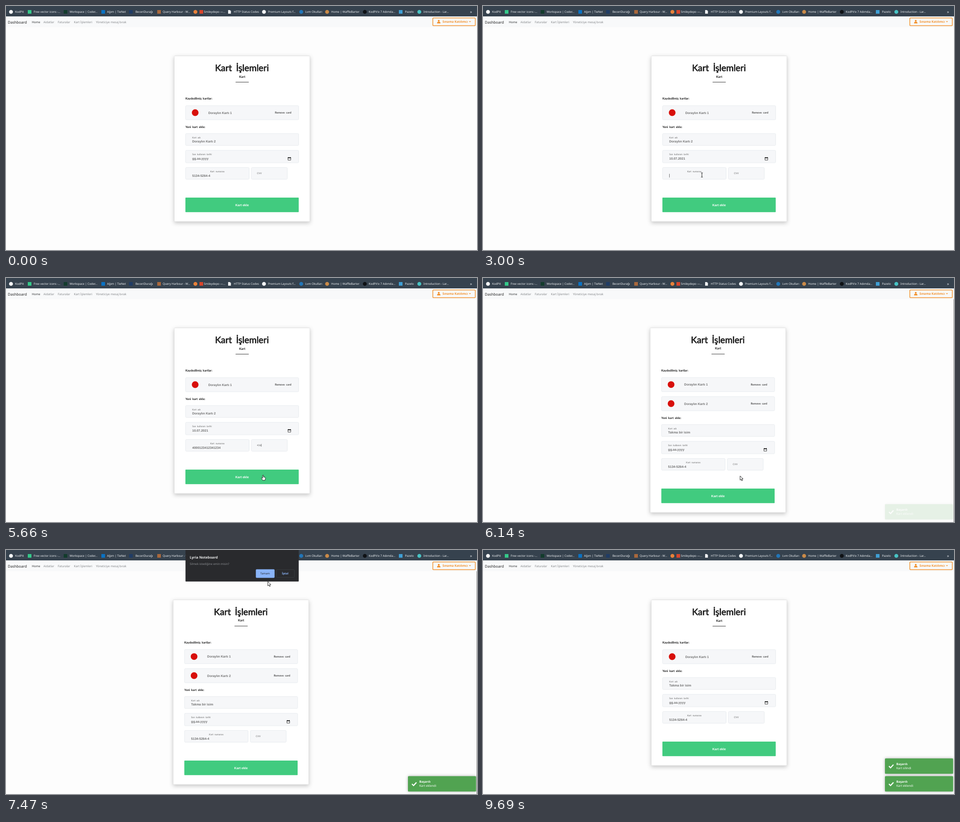
An HTML page that plays this animation: 1037x540 px, repeating every 9890 ms.

```html
<!DOCTYPE html>
<html lang="tr">
<head>
<meta charset="utf-8">
<title>Kart İşlemleri</title>
<style>
html, body { margin: 0; width: 100%; height: 100%; overflow: hidden; background: #fdfdfd; }
svg { display: block; width: 100vw; height: 100vh; }
text { white-space: pre; text-rendering: geometricPrecision; }
.ui { font-family: "Noto Sans", "Open Sans", sans-serif; }
.form { font-family: "Liberation Sans", Arial, sans-serif; font-weight: 700; font-size: 7px; fill: #707070; }
.hand { font-family: Lato, "Open Sans", sans-serif; word-spacing: 1.2px; }
.title { word-spacing: 4px; stroke: #1b1b1b; stroke-width: .75px; stroke-linejoin: round; }
.b { font-weight: 700; }
.m { font-weight: 600; }
.mid { text-anchor: middle; }
.panel { filter: drop-shadow(0 3px 5px rgba(0, 0, 0, .22)); }
.toast { filter: drop-shadow(0 0 3px rgba(0, 0, 0, .3)); }
</style>
</head>
<body>
<svg id="stage" viewBox="0 0 1037 540" xmlns="http://www.w3.org/2000/svg"></svg>
<script>
const LOOP = 9890;

const rect = (x, y, w, h, fill, more = "") =>
  `<rect x="${x}" y="${y}" width="${w}" height="${h}" fill="${fill}" ${more}/>`;
const dot = (x, y, r, fill) => `<circle cx="${x}" cy="${y}" r="${r}" fill="${fill}"/>`;
const path = (d, more) => `<path d="${d}" ${more}/>`;
const label = (x, y, s, size, cls, fill, more = "") =>
  `<text x="${x}" y="${y}" class="${cls}" style="font-size:${size}px;fill:${fill}" ${more}>${s}</text>`;
const value = (x, y, s, id = "") => `<text x="${x}" y="${y}" class="form" id="${id}">${s}</text>`;
const group = (id, body, more = "") => `<g id="${id}" ${more}>${body}</g>`;
const field = (x, y, w, h) => rect(x, y, w, h, "#f6f7f9", 'rx="2" stroke="#e6eaee" stroke-width=".9"');

// [icon x, shape, colour, text x, title]
const bookmarks = [
  [11, "o", "#f4f5f6", 20, "KodPit"],
  [52, "s", "#35c98a", 61, "Free vector icons -..."],
  [131, "s", "#123b2c", 140, "Workspace | Coder..."],
  [214, "s", "#0a72c4", 222.5, "Ağım | TieNet"],
  [275, "s", "#203c66", 285, "BeceriDurağı"],
  [337, "s", "#a9683c", 345, "Query Harbour - W..."],
  [417, "o", "#e8813a", 0, ""],
  [430, "s", "#d8452c", 435.5, "Smileydepo —..."],
  [492, "d", "#eceff1", 501.5, "HTTP Status Codes"],
  [568, "o", "#f1f3f4", 577, "Premium Layouts f..."],
  [650, "o", "#2276b8", 659, "Lvm Okulları"],
  [707, "o", "#c98a48", 716, "Home | WaffleBarter"],
  [790, "o", "#0f1215", 798.5, "KodPit'e 7 Adımda..."],
  [869, "s", "#3f9fd4", 878.5, "Pazelo"],
  [910, "o", "#48c3c4", 919, "Introduction - Lar..."]
];

function bookmarkIcon(x, shape, fill) {
  if (shape === "o") return dot(x, 13, 4.3, fill);
  if (shape === "s") return rect(x - 4, 9, 8, 8, fill);
  return path(`M${x - 3} 9h4l2.2 2.2v5.8h-6.2z`, `fill="${fill}"`);
}

function header() {
  const links = [[57, "Home", "#2a2c2e"], [82.5, "Aidatlar", "#808386"], [114, "Faturalar", "#808386"],
    [149.5, "Kart İşlemleri", "#808386"], [198, "Yöneticiye mesaj bırak", "#808386"]];
  const orange = "#f2902a";
  return rect(0, 0, 1037, 23, "#36424e") +
    bookmarks.map(([x, shape, fill, tx, s]) =>
      bookmarkIcon(x, shape, fill) + label(tx, 15.2, s, 6.3, "ui", "#f4f6f8")).join("") +
    label(1021.5, 15.5, "»", 9, "ui", "#e9ecef") +
    rect(0, 23, 1037, 24, "#f8f9fa") +
    label(4, 38.6, "Dashboard", 8.1, "ui", "#222") +
    links.map(([x, s, fill]) => label(x, 37.5, s, 6.45, "ui", fill)).join("") +
    rect(939.7, 26.6, 93.6, 16.8, "none", `rx="1.2" stroke="${orange}" stroke-width="1.5"`) +
    dot(952.8, 32.8, 2, orange) +
    path("M949.2 38.4v-1.2q0-2.2 2.2-2.2h2.8q2.2 0 2.2 2.2v1.2z", `fill="${orange}"`) +
    label(961, 37.3, "Sınama Katılımcı", 6.7, "ui m", orange) +
    path("M1019.2 33.7h4.6l-2.3 2.4z", `fill="${orange}"`);
}

const savedCard = n => field(395.4, 220.6, 249, 31.2) + dot(416.5, 236, 7.4, "#d80f0a") +
  value(445.5, 238.5, "Doraylın Kartı " + n) +
  label(592, 238.4, "Remove card", 6.1, "hand b", "#4c4c4c");

const calendarIcon = path("M620.9 335.6h6v5.5h-6z", 'fill="none" stroke="#111" stroke-width=".8"') +
  rect(620.5, 335, 6.8, 1.7, "#111") + rect(621.4, 334.3, 1, 1, "#111") + rect(625.4, 334.3, 1, 1, "#111");

function form() {
  return rect(370.5, 110.5, 298.5, 366.5, "#fff", 'id="panel" class="panel" stroke="#dcdcdc" stroke-width=".8" rx="1"') +
    label(519.5, 144, "Kart İşlemleri", 19.8, "hand title mid", "#1b1b1b") +
    label(520, 158.5, "Kart", 7, "hand b mid", "#151515") +
    rect(505.5, 168, 29, 1, "#333") +
    label(395, 207.3, "Kaydedilmiş kartlar:", 6.6, "hand b", "#151515") +
    savedCard(1) +
    group("second", savedCard(2), 'transform="translate(0 42.2)"') +
    group("lower",
      label(395, 270, "Yeni kart ekle:", 6.6, "hand b", "#151515") +
      field(395.4, 282.2, 249, 26.5) +
      label(410, 293.2, "Kart adı", 5, "hand", "#606060") + value(410, 302, "", "name") +
      field(395.4, 319.4, 249, 27.6) +
      label(410, 329.9, "Son kullanım tarihi", 5, "hand", "#606060") + value(410, 340.2, "", "date") + calendarIcon +
      field(395.4, 357.4, 140, 26) +
      label(449.5, 368.3, "Kart numarası", 5, "hand", "#606060") + value(410, 377.6, "", "number") +
      field(540.4, 357.4, 79, 26) +
      label(552.5, 372, "", 5.2, "hand", "#606060", 'id="cvv"') +
      rect(0, 0, .7, 8, "#333", 'id="caret"') +
      rect(395, 424, 249.5, 32.2, "#41cb7f", 'rx="1"') +
      `<text x="519.8" y="442.5" class="form mid" style="fill:#fff">Kart ekle</text>`);
}

function picker() {
  let out = rect(403.5, 346.5, 116, 139, "#fff", 'stroke="#b5b5b5" stroke-width=".8"') +
    label(409, 358.5, "Temmuz 2021", 6.6, "ui b", "#222") +
    path("M499 358v-5m-2 2 2-2 2 2M511 353v5m-2-2 2 2 2-2", 'fill="none" stroke="#333" stroke-width=".8"') +
    rect(486, 385, 14, 12, "#d5e5fb", 'rx="1.5"');
  ["Pt", "Sa", "Ça", "Pe", "Cu", "Ct", "Pz"].forEach((s, c) => {
    out += label(412 + 16.2 * c, 369, s, 5.8, "ui mid", "#555");
  });
  for (let n = 0; n < 42; n++) {
    const inside = n >= 3 && n < 34;
    const day = inside ? n - 2 : n < 3 ? 28 + n : n - 33;
    out += label(412 + 16.2 * (n % 7), 379 + 14.5 * Math.floor(n / 7), day, 6, "ui mid", inside ? "#222" : "#aaa");
  }
  return out + label(409, 478, "Temizle", 6, "ui", "#1a73e8") + label(496, 478, "Bugün", 6, "ui", "#1a73e8");
}

const toast = s => rect(885, 500.6, 150, 34, "#51a351", 'rx="1.5" class="toast"') +
  path("M893.8 517.8l3.5 3.6 6.4-7", 'fill="none" stroke="#fff" stroke-width="2.3"') +
  label(910, 515, "Başarılı", 6.6, "ui b", "#fff") + label(910, 524.3, s, 6.6, "ui", "#fff");

const dialog = rect(395.2, -1, 249.3, 70.8, "#292a2d", 'rx="1"') +
  label(404.5, 19.2, "Lyria Noteboard", 7.6, "ui b", "#eceded") +
  label(404.5, 33, "Silmek istediğine emin misin?", 6.3, "ui", "#8e9094") +
  rect(550.4, 43, 40.6, 18.3, "#8ab4f8", 'rx="1.5" stroke="#7fa9ee" stroke-width=".8"') +
  label(570.5, 54.2, "Tamam", 6, "ui mid", "#25282d") +
  rect(595.5, 43.4, 39.5, 17.4, "none", 'rx="1.5" stroke="#3c4043" stroke-width=".8"') +
  label(614.7, 54.2, "İptal", 6, "ui b mid", "#8ab4f8");

const outline = 'fill="#fff" stroke="#111" stroke-width=".9" stroke-linejoin="round"';
const pointers = {
  arrow: path("M0 0v9.3l2.2-2 1.5 3.5 1.6-.7-1.5-3.4h3z", outline),
  beam: path("M-2-4.8h1.4l.6.6.6-.6h1.4M0-4.2v8.4M-2 4.8h1.4l.6-.6.6.6h1.4", 'fill="none" stroke="#111" stroke-width="1"'),
  hand: path("M-1 5V.8Q0-.6 1 .8V4.4l3.4.8q1.2.4 1 1.8l-.6 2.6-.8 2.2H-.6L-3.6 7.4q-.2-1.6 1.2-1.2l1.4 1.2z", outline)
};

const stage = document.getElementById("stage");
stage.innerHTML = rect(0, 0, 1037, 540, "#fdfdfd") +
  header() + group("form", form()) + group("picker", picker()) +
  rect(1036, 47, 1, 493, "#8a8a8a", 'id="scroll"') +
  group("added", toast("Kart eklendi")) +
  group("removed", toast("Kart silindi"), 'transform="translate(0 -39.4)"') +
  group("dialog", dialog) +
  group("pointer", Object.keys(pointers).map(k => group(k, pointers[k])).join(""));

const el = {};
stage.querySelectorAll("[id]").forEach(e => { if (e.id) el[e.id] = e; });
const show = (e, on) => e.setAttribute("display", on ? "inline" : "none");
const put = (e, s) => { if (e.textContent !== s) e.textContent = s; };
const ramp = (t, from, span) => Math.min(1, Math.max(0, (t - from) / span));
const swing = p => .5 - Math.cos(p * Math.PI) / 2;

// pointer stops: time, x, y
const stops = [
  [200, 836, 499], [850, 624, 337], [930, 624, 337], [1140, 550, 361], [1450, 456, 396], [1730, 493, 388],
  [1870, 493, 388], [2270, 482, 372], [2800, 482, 372], [3000, 482, 374], [3260, 482, 374], [3460, 541, 397],
  [3660, 541, 397], [4100, 570, 390], [4600, 573, 373], [4670, 573, 373], [4930, 571, 389], [5130, 569, 392],
  [5330, 569, 392], [5660, 566, 436], [5860, 566, 436], [6140, 566, 438], [6330, 566, 438],
  [6870, 606, 277], [7060, 606, 277], [7470, 576.5, 70], [7600, 576, 52.8], [8380, 576, 52.8],
  [8890, 750, 245], [9560, 1040, 548]
];

// [start, pointer shape]
const shapes = [[200, "arrow"], [2270, "beam"], [3400, "arrow"], [4350, "beam"], [4860, "arrow"],
  [5520, "hand"], [6000, "arrow"], [6850, "hand"], [7130, "arrow"], [9560, ""]];

function movePointer(t) {
  const now = shapes.filter(s => s[0] <= t).pop();
  for (const k in pointers) show(el[k], now && now[1] === k);
  const i = Math.max(0, stops.findLastIndex(s => s[0] <= t));
  const a = stops[i], b = stops[i + 1] || a;
  const p = swing(ramp(t, a[0], b[0] - a[0] || 1));
  el.pointer.setAttribute("transform", `translate(${a[1] + (b[1] - a[1]) * p} ${a[2] + (b[2] - a[2]) * p})`);
}

function placeCaret(t) {
  const inNumber = t >= 2800 && t < 4670, inCvv = t >= 4670 && t < 6000;
  show(el.caret, inNumber || inCvv);
  const digits = t >= 5330 ? 3 : t >= 5130 ? 2 : t >= 4930 ? 1 : 0;
  put(el.cvv, inCvv && digits ? "436".slice(0, digits) : "CVV");
  const x = inCvv ? 552.6 + 3.02 * digits : t < 3330 ? 410 : 472.6;
  el.caret.setAttribute("x", x);
  el.caret.setAttribute("y", inCvv ? 367.3 : 371.5);
  el.caret.setAttribute("height", inCvv ? 5.8 : 8);
}

function render(t) {
  const saved = t >= 6000, two = saved && t < 8220;
  el.form.setAttribute("transform", two ? "translate(-2.4 -.2)" : "");
  el.lower.setAttribute("transform", two ? "translate(0 42.2)" : "");
  el.panel.setAttribute("height", two ? 408.7 : 366.5);
  show(el.second, two);
  show(el.scroll, two);

  put(el.name, saved ? "Takma bir isim" : "Doraylın Kartı 2");
  put(el.date, t >= 1870 && !saved ? "10.07.2021" : "gg.aa.yyyy");
  put(el.number, t < 2800 || saved ? "5134-5264-4" : t < 3330 ? "" : "4000123412341234");
  placeCaret(t);
  show(el.picker, t >= 900 && t < 1870);

  el.added.setAttribute("opacity", swing(ramp(t, 6072, 300)));
  el.removed.setAttribute("opacity", swing(ramp(t, 8222, 300)));

  const shown = ramp(t, 6980, 150) - ramp(t, 8150, 160);
  el.dialog.setAttribute("opacity", shown);
  el.dialog.setAttribute("transform", `translate(0 ${-9.8 * (1 - shown)})`);
  movePointer(t);
}

const start = performance.now();
function tick() {
  render((performance.now() - start) % LOOP);
  requestAnimationFrame(tick);
}
tick();
</script>
</body>
</html>
```
